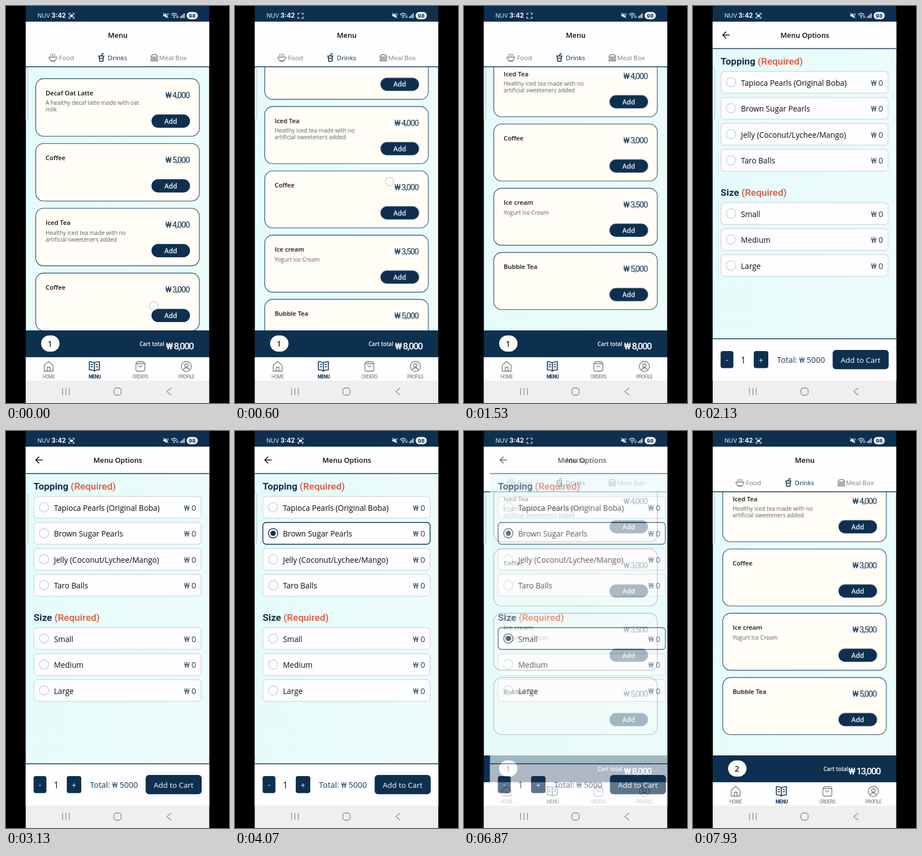
Animation, 400 px wide and 711 px high, one loop 8 s. Source, as an HTML page:

```html
<!DOCTYPE html>
<html lang="en">
<head>
<meta charset="utf-8">
<title>Menu</title>
<style>
html, body { margin: 0; width: 100%; height: 100%; overflow: hidden; background: #000; }
svg { display: block; width: 100vw; height: 100vh; }
text { font-family: "Open Sans", "Noto Sans", sans-serif; fill: #0c0e10; }
.title { font-size: 11.4px; font-weight: 600; }
.desc { font-size: 10.2px; fill: #5c5f61; }
.price { font: 400 14.9px Roboto, sans-serif; letter-spacing: -1.15px; fill: #0d3050; text-anchor: end; }
.add { font-size: 12px; font-weight: 600; fill: #fff; text-anchor: middle; }
.bar-title { font-size: 12.8px; font-weight: 600; text-anchor: middle; }
.category { font-size: 11.6px; fill: #7d7f81; }
.tab { font: 400 8.4px Roboto, sans-serif; letter-spacing: -.5px; fill: #6d6f71; text-anchor: middle; }
.category.on { fill: #0d3050; }
.tab.on { fill: #0d3050; font-weight: 600; }
.total { font: 500 17px Roboto, sans-serif; letter-spacing: -1.5px; fill: #fff; text-anchor: end; }
.total-label { font-size: 9.8px; font-weight: 600; fill: #fff; text-anchor: end; }
.count { font-size: 14.5px; font-weight: 600; fill: #0d3050; text-anchor: middle; }
.heading { font: 700 17.3px Roboto, sans-serif; fill: #14304f; }
.required { font-weight: 500; fill: #e2573a; }
.option { font-size: 13.7px; }
.quantity { font-size: 15.5px; }
.cost { font-size: 14.4px; fill: #1c3d5a; }
.submit { font-size: 13.5px; }
.status { font: 400 10.4px Inter, sans-serif; fill: #e9eef3; }
.clock { font-size: 11.4px; font-weight: 700; fill: #fff; }
.battery { font-size: 9.5px; font-weight: 700; fill: #0d3050; }
.light { fill: #fff; }
.mid { text-anchor: middle; }
.end { text-anchor: end; }
.icon { fill: none; stroke: #77797b; stroke-width: 1.3; stroke-linecap: round; stroke-linejoin: round; }
.icon.on { stroke: #0d3050; stroke-width: 1.6; }

.list, .page, .touch, .before, .after, .topping, .size { animation: 8s linear infinite; }
.list { transform-origin: 0 109px; animation-name: scroll; }
.page { animation-name: page; }
.touch { animation-name: touch; }
.dot { animation: blink 1s step-end infinite; }
.before { animation-name: before; animation-timing-function: step-end; }
.after { animation-name: after; animation-timing-function: step-end; }
.topping { animation-name: topping; animation-timing-function: step-end; }
.size { animation-name: size; animation-timing-function: step-end; }

@keyframes scroll {
  0% { transform: translateY(0) scaleY(1.0085); }
  1.6% { transform: translateY(0) scaleY(1); }
  7.5% { transform: translateY(-179.4px) scaleY(1); animation-timing-function: cubic-bezier(.15, .6, .4, 1); }
  14%, 100% { transform: translateY(-264px) scaleY(1); }
}
@keyframes page {
  0%, 23.2% { opacity: 0; transform: translateX(34px); animation-timing-function: ease-out; }
  25.8%, 84.5% { opacity: 1; transform: none; animation-timing-function: ease-in; }
  87.2%, 100% { opacity: 0; transform: translateX(34px); }
}
@keyframes touch {
  0%, .4% { opacity: 1; transform: translate(265px, 537px); }
  7.5% { opacity: 1; transform: translate(277px, 315px); }
  8.5% { opacity: 1; transform: translate(279px, 272px); animation-timing-function: step-end; }
  8.6% { opacity: 0; transform: translate(298px, 517px); animation-timing-function: step-end; }
  21% { opacity: 1; transform: translate(298px, 517px); animation-timing-function: step-end; }
  22.2% { opacity: 0; transform: translate(190px, 187px); animation-timing-function: step-end; }
  45% { opacity: 1; transform: translate(190px, 187px); animation-timing-function: step-end; }
  46.2% { opacity: 0; transform: translate(180px, 374px); animation-timing-function: step-end; }
  67% { opacity: 1; transform: translate(180px, 374px); animation-timing-function: step-end; }
  68.2% { opacity: 0; transform: translate(300px, 636px); animation-timing-function: step-end; }
  82% { opacity: 1; transform: translate(300px, 636px); animation-timing-function: step-end; }
  83.2%, 100% { opacity: 0; transform: translate(300px, 636px); }
}
@keyframes blink { 0% { opacity: 1; } 40% { opacity: 0; } 90%, 100% { opacity: 1; } }
@keyframes before { 0% { opacity: 1; } 88.5%, 100% { opacity: 0; } }
@keyframes after { 0% { opacity: 0; } 88.5%, 100% { opacity: 1; } }
@keyframes topping { 0% { opacity: 0; } 46.3%, 100% { opacity: 1; } }
@keyframes size { 0% { opacity: 0; } 68.3%, 100% { opacity: 1; } }
</style>
</head>
<body>
<svg id="stage" viewBox="0 0 400 711"></svg>
<script>
const NAVY = '#0d3050', PAPER = '#fefdff', LINE = '#24445f', WATER = 'url(#water)';
const rect = (x, y, w, h, fill, r = 0, extra = '') =>
  `<rect x="${x}" y="${y}" width="${w}" height="${h}" rx="${r}" fill="${fill}" ${extra}/>`;
const band = (y, h, fill) => rect(35.4, y, 329.2, h, fill);
const text = (x, y, cls, str) => `<text x="${x}" y="${y}" class="${cls}">${str}</text>`;
const icon = (d, cls, x, y) =>
  `<path class="icon ${cls}" transform="translate(${x} ${y})" d="${d}"/>`;
const group = (cls, body) => `<g class="${cls}">${body}</g>`;
const outline = (color, width) => `stroke="${color}" stroke-width="${width}"`;
const stroke = (d, color, width) => `<path d="${d}" fill="none" ${outline(color, width)}/>`;

const drinks = [
  ['Decaf Oat Latte', '4,000', 'A healthy decaf latte made with oat', 'milk'],
  ['Coffee', '5,000'],
  ['Iced Tea', '4,000', 'Healthy iced tea made with no', 'artificial sweeteners added'],
  ['Coffee', '3,000'],
  ['Ice cream', '3,500', 'Yogurt Ice Cream'],
  ['Bubble Tea', '5,000']
];

const card = ([name, price, ...lines], i) => {
  const y = 130 + i * 115.1;
  return rect(53.4, y, 293.4, 102.2, '#fffdf6', 14, outline(LINE, 1.1)) +
    text(71, y + 29.2, 'title', name) +
    lines.map((line, n) => text(71, y + 46.8 + n * 12, 'desc', line)).join('') +
    text(329, y + 34.3, 'price', '₩ ' + price) +
    rect(261, y + 63.5, 69, 23.5, NAVY, 11.75) +
    text(295.5, y + 79.7, 'add', 'Add');
};

const cart = (cls, count, total, labelX) => group(cls,
  text(79, 610.3, 'count', count) +
  text(labelX, 609, 'total-label', 'Cart total') +
  text(336, 614.5, 'total', '₩ ' + total));

const menu =
  band(109, 472, WATER) +
  `<g clip-path="url(#listArea)">${group('list', drinks.map(card).join(''))}</g>` +
  band(28, 80, PAPER) + band(108, 1.6, LINE) +
  text(200.5, 57, 'bar-title', 'Menu') +
  icon('M0 6H14C14 10 11 13 7 13S0 10 0 6ZM4 13.5H10M3.5 3.5V1M7 3.5V0M10.5 3.5V1', '', 77, 85.5) +
  text(95, 97, 'category', 'Food') +
  icon('M0 4H10M1 4L2 13.5H8L9 4M5 4L6.5 0H9M1.6 8H8.4', 'on', 166, 85.5) +
  text(182.5, 97, 'category on', 'Drinks') +
  icon('M0 4.5C0 1 3 0 6 0S12 1 12 4.5ZM0 7H12M0 9.3H12V11.3H0Z', '', 260, 87) +
  text(274.5, 97, 'category', 'Meal Box') +
  band(581, 48, NAVY) +
  rect(63, 590, 33, 29, '#fffdf4', 14.5) +
  cart('before', 1, '8,000', 284) + cart('after', 2, '13,000', 278.5) +
  band(629, 42, PAPER) +
  icon('M0 7L8 0L16 7V17.5H0ZM5.5 17.5V10.5H10.5V17.5', '', 68.5, 636.5) +
  icon('M9 2.5C7 .5 4 0 0 0V14.5C4 14.5 7 15 9 17C11 15 14 14.5 18 14.5V0C14 0 11 .5 9 2.5ZV17M3 5H6M3 9H6M12 5H15M12 9H15', 'on', 149.5, 637) +
  icon('M0 3L3 0H13L16 3V14Q16 17 13 17H3Q0 17 0 14ZM0 3.5H16M5 7Q8 12 11 7', '', 233, 637) +
  icon('M9 0A9 9 0 1 0 9.1 0ZM9 4A3.2 3.2 0 1 0 9.1 4ZM3.5 15.5Q5 11.5 9 11.5T14.5 15.5', '', 314.5, 636.5) +
  [['HOME', 76.5], ['MENU', 159], ['ORDERS', 241], ['PROFILE', 323.5]]
    .map(([name, x]) => text(x, 667.3, name === 'MENU' ? 'tab on' : 'tab', name)).join('');

const option = (y, name, picked) => {
  const cy = y + 19.3;
  const box = color => rect(50, y, 300, 39, '#fdfcff', 6, outline(color, 1.4));
  const ring = color => `<circle cx="68.3" cy="${cy}" r="8.4" fill="#fdfcff" ${outline(color, 1.4)}/>`;
  return box('#d5dddf') + ring('#cbd2d7') +
    (picked ? group(picked, box(NAVY) + ring(NAVY) +
      `<circle cx="68.3" cy="${cy}" r="4.7" fill="${NAVY}"/>`) : '') +
    text(86, y + 25.2, 'option', name) + text(341, y + 25.2, 'cost end', '₩ 0');
};

const section = (y, name, options, picked, index) =>
  `<text x="49.5" y="${y}" class="heading">${name} <tspan class="required">(Required)</tspan></text>` +
  options.map((label, i) => option(y + 12 + i * 46.5, label, i === index && picked)).join('');

const optionsPage =
  band(28, 643, WATER) + band(28, 48, PAPER) + band(75.5, 1.6, LINE) +
  stroke('M66 52H54M59.5 46L53.5 52L59.5 58', '#14181c', 1.7) +
  text(200.5, 57, 'bar-title', 'Menu Options') +
  section(105.3, 'Topping', ['Tapioca Pearls (Original Boba)', 'Brown Sugar Pearls',
    'Jelly (Coconut/Lychee/Mango)', 'Taro Balls'], 'topping', 1) +
  section(340.3, 'Size', ['Small', 'Medium', 'Large'], 'size', 0) +
  band(596, 75, PAPER) + band(595.2, 1.6, LINE) +
  rect(49.5, 618, 23, 30.5, NAVY, 4) + text(61, 639, 'option light mid', '-') +
  text(90.3, 640, 'quantity mid', '1') +
  rect(109, 618, 26, 30.5, NAVY, 4) + text(122, 640, 'option light mid', '+') +
  text(150.5, 639, 'cost', 'Total: ₩ 5000') +
  rect(250.5, 616, 100.5, 34.5, NAVY, 6) +
  text(300.7, 639, 'submit light mid', 'Add to Cart');

const bars = [0, 1, 2, 3].map(i => rect(312 + i * 2.3, 19 - i * 2, 1.5, 2.5 + i * 2, '#e9eef3')).join('');
const statusBar =
  band(0, 28, NAVY) +
  text(56.5, 21, 'status', 'NUV') + text(81.5, 21, 'status clock', '3:42') +
  stroke('M113 16V13H116M119 13H122V16M122 19V22H119M116 22H113V19', '#fff', 1.2) +
  group('dot', rect(114.8, 15.2, 5.4, 4.6, '#fff', 1.6)) +
  '<path d="M282 15.5H284.5L288 12.5V21.5L284.5 18.5H282Z" fill="#e9eef3"/>' +
  stroke('M282 12.5L291 21.5M291 13L288.8 20', '#e9eef3', 1.1) +
  stroke('M296 15.5Q301.5 10.5 307 15.5M298 17.8Q301.5 14.5 305 17.8', '#e9eef3', 1.3) +
  '<circle cx="301.5" cy="20" r="1.4" fill="#e9eef3"/>' +
  stroke('M306 17V21.5M308.5 21.5V17', '#e9eef3', 1) + bars +
  rect(324, 10.7, 20, 13, '#f4f6f8', 6.5) + text(334, 20.7, 'status battery mid', '98');

const systemBar =
  band(671, 40, '#f0eff0') +
  stroke('M101.5 684V697M107.5 684V697M113.5 684V697M296.5 684L288.5 690.5L296.5 697', '#858586', 1.2) +
  rect(193.5, 684, 13, 13, 'none', 4.8, outline('#858586', 1.3));

document.getElementById('stage').innerHTML =
  `<defs>
    <linearGradient id="water" x1="0" x2="1" y2=".3"><stop stop-color="#e5fbfb"/><stop offset="1" stop-color="#ebfcfb"/></linearGradient>
    <clipPath id="listArea">${band(109, 472, NAVY)}</clipPath>
    <clipPath id="screen">${band(0, 711, NAVY)}</clipPath>
  </defs>
  <g clip-path="url(#screen)">` +
  menu + group('page', optionsPage) + statusBar + systemBar +
  rect(30, 111.5, 9, 91, '#f3f6f7', 3, 'fill-opacity=".4" ' + outline('#b9c1c4', 1)) +
  group('touch', `<circle r="7.6" fill="#fff" fill-opacity=".65" ${outline('#c0c8d0', 1.2)}/>`) +
  '</g>';
</script>
</body>
</html>
```
